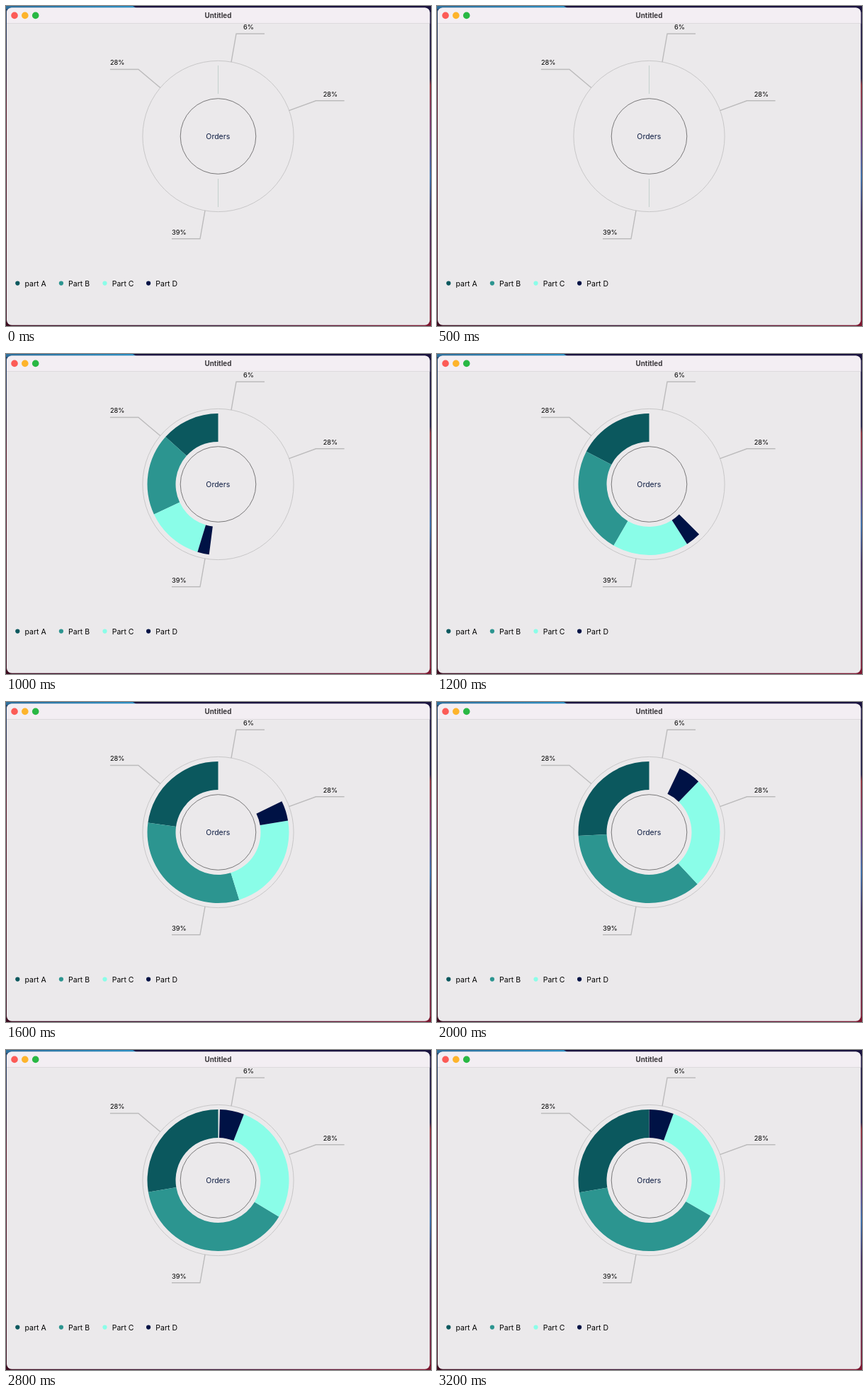
These frames come from a looping animation (600x452 px, 3300 ms). An HTML page:

```html
<!DOCTYPE html>
<html lang="en">
<head>
<meta charset="utf-8">
<title>Untitled</title>
<style>
  html, body { margin: 0; width: 100%; height: 100%; overflow: hidden; background: #1a1238; }
  svg { display: block; width: 600px; height: 452px; }
  text { font-family: Inter, "Open Sans", sans-serif; fill: #000; }
</style>
</head>
<body>
<svg id="stage" viewBox="0 0 600 452" xmlns="http://www.w3.org/2000/svg">
  <defs>
    <linearGradient id="topEdge">
      <stop offset="0" stop-color="#2f6f9c"/>
      <stop offset="1" stop-color="#2d8fc4"/>
    </linearGradient>
    <linearGradient id="leftEdge" x2="0" y2="1">
      <stop offset="0" stop-color="#27486f"/>
      <stop offset=".2" stop-color="#2a1b3c"/>
      <stop offset=".3" stop-color="#571527"/>
      <stop offset="1" stop-color="#3c0d20"/>
    </linearGradient>
    <linearGradient id="rightEdge" x2="0" y2="1">
      <stop offset="0" stop-color="#1b1440"/>
      <stop offset=".22" stop-color="#1b1440"/>
      <stop offset=".24" stop-color="#86202f"/>
      <stop offset=".4" stop-color="#6b2f74"/>
      <stop offset=".53" stop-color="#2c62a4"/>
      <stop offset=".65" stop-color="#3a2257"/>
      <stop offset="1" stop-color="#7d1730"/>
    </linearGradient>
    <linearGradient id="bottomEdge">
      <stop offset="0" stop-color="#3c0d20"/>
      <stop offset=".5" stop-color="#3a1736"/>
      <stop offset="1" stop-color="#7d1730"/>
    </linearGradient>
    <clipPath id="window"><rect x="1" y="2.5" width="597.3" height="448.3" rx="7"/></clipPath>
  </defs>
  <rect width="600" height="452" fill="#1b1440"/>
  <path d="M0 0H179L186 4H0Z" fill="url(#topEdge)"/>
  <rect y="4" width="9" height="448" fill="url(#leftEdge)"/>
  <rect x="591" y="4" width="9" height="448" fill="url(#rightEdge)"/>
  <rect y="443" width="600" height="9" fill="url(#bottomEdge)"/>
  <g clip-path="url(#window)">
    <rect width="600" height="452" fill="#ebe9eb"/>
    <rect width="600" height="24" fill="#f3eef3"/>
    <rect y="24" width="600" height="1" fill="#dedade"/>
  </g>
  <circle cx="12" cy="13.4" r="4.8" fill="#fc5b57"/>
  <circle cx="26.8" cy="13.4" r="4.8" fill="#fdb42c"/>
  <circle cx="41.7" cy="13.4" r="4.8" fill="#29b844"/>
  <text x="299.5" y="16.8" font-size="9.8" font-weight="700" text-anchor="middle" style="fill:#3b383c">Untitled</text>
  <circle cx="299.5" cy="184" r="106.6" fill="none" stroke="#c8c7c8"/>
  <circle cx="299.5" cy="184" r="53.3" fill="none" stroke="#6c6b6d" stroke-width=".9"/>
  <text x="299.3" y="188" font-size="10.5" text-anchor="middle" style="fill:#0b1a40">Orders</text>
  <g id="chart"></g>
  <path id="seam" d="M299.5 84V124M299.5 244V284" stroke="#c3d0cd"/>
</svg>
<script>
const CX = 299.5, CY = 184, INNER = 60, OUTER = 100;
const LOOP = 3300, STEP = 100, START = 548, DURATION = 3000;
const parts = [
  { name: 'part A', color: '#0b585e', sweep: 100, label: '28%' },
  { name: 'Part B', color: '#2c9590', sweep: 140, label: '39%' },
  { name: 'Part C', color: '#8afde8', sweep: 100, label: '28%' },
  { name: 'Part D', color: '#001245', sweep: 20, label: '6%' }
];
const chart = document.getElementById('chart');
const seam = document.getElementById('seam');

function add(tag, attrs, text) {
  const el = document.createElementNS('http://www.w3.org/2000/svg', tag);
  for (const key in attrs) el.setAttribute(key, attrs[key]);
  if (text) el.textContent = text;
  return chart.appendChild(el);
}

// Angles run counterclockwise from twelve o'clock.
function polar(radius, degrees) {
  const a = degrees * Math.PI / 180;
  return [CX - radius * Math.sin(a), CY - radius * Math.cos(a)];
}

function ringSlice(from, to) {
  const large = to - from > 180 ? 1 : 0;
  return `M${polar(OUTER, from)}A${OUTER} ${OUTER} 0 ${large} 0 ${polar(OUTER, to)}` +
    `L${polar(INNER, to)}A${INNER} ${INNER} 0 ${large} 1 ${polar(INNER, from)}Z`;
}

let total = 0;
parts.forEach((part, i) => {
  part.from = total;
  total += part.sweep;
  part.slice = add('path', { fill: part.color });

  const middle = part.from + part.sweep / 2;
  const [x, y] = polar(147, middle);
  const onLeft = x < CX;
  const end = x + (onLeft ? -40 : 40);
  add('path', {
    d: `M${polar(106.6, middle)}L${x} ${y}H${end}`,
    fill: 'none', stroke: '#bcbbbc', 'stroke-width': 1.4
  });
  add('text', { x: onLeft ? end : x + 10, y: y - 6.2, 'font-size': 9.3 }, part.label);

  const legendX = 16.3 + 61.6 * i;
  add('circle', { cx: legendX, cy: 391.6, r: 3.1, fill: part.color });
  add('text', { x: legendX + 10.2, y: 395.5, 'font-size': 10.5 }, part.name);
});

function render(time) {
  const now = Math.floor(time % LOOP / STEP) * STEP;
  const u = Math.min(1, Math.max(0, (now - START) / DURATION));
  const progress = 1 - (1 - u) ** 4;
  seam.style.display = progress ? 'none' : '';
  for (const { slice, from, sweep } of parts) {
    slice.setAttribute('d', progress ? ringSlice(from * progress, (from + sweep) * progress) : '');
  }
}

const origin = performance.now();
function tick() {
  render(performance.now() - origin);
  requestAnimationFrame(tick);
}
tick();
</script>
</body>
</html>
```
